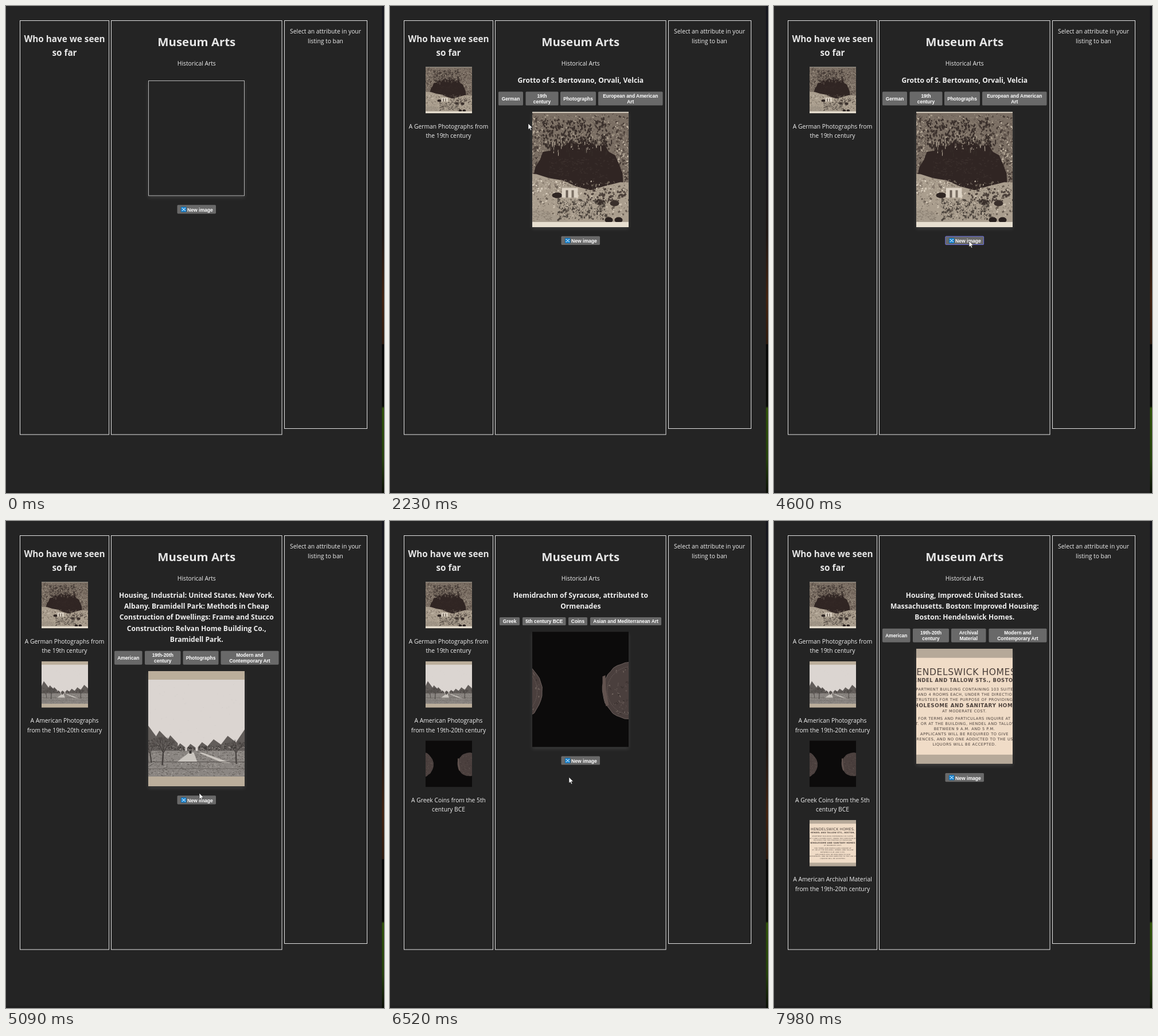
An HTML page for the animation above (8000 ms loop, 659 by 850 pixels).

```html
<!DOCTYPE html>
<html lang="en">
<head>
<meta charset="utf-8">
<title>Museum Arts</title>
<style>
  html, body { margin: 0; width: 100%; height: 100%; overflow: hidden; background: #242424; }
  svg { display: block; }
  text { font: 10.3px "Open Sans", sans-serif; fill: #f0f0f0; text-anchor: middle; }
  .h1 { font-size: 20.4px; font-weight: 700; fill: #e6e6e6; }
  .h2 { font-size: 15.3px; font-weight: 700; fill: #e6e6e6; }
  .title { font-size: 12.1px; font-weight: 700; }
  .tag { font: bold 8.4px "Liberation Sans", Arial, sans-serif; fill: #fff; }
  .print { font: 6.6px "DejaVu Sans", sans-serif; letter-spacing: .55px; fill: #4b403b; }
  .panel { fill: none; stroke: #e2e2e2; }
  .frame { fill: #242424; filter: drop-shadow(0 3px 3px #ffffff1c); }
</style>
</head>
<body>
<svg id="stage" width="659" height="850" viewBox="0 0 659 850">
  <defs>
    <linearGradient id="edge" x2="0" y2="1">
      <stop offset="0" stop-color="#15161d"/>
      <stop offset=".32" stop-color="#16161e"/>
      <stop offset=".47" stop-color="#1d1512"/>
      <stop offset=".6" stop-color="#41220f"/>
      <stop offset=".694" stop-color="#2e1a0e"/>
      <stop offset=".695" stop-color="#050505"/>
      <stop offset=".822" stop-color="#080a05"/>
      <stop offset=".826" stop-color="#2f5208"/>
      <stop offset=".93" stop-color="#24400a"/>
      <stop offset="1" stop-color="#0a0d06"/>
    </linearGradient>
    <g id="photos"></g>
  </defs>
  <rect width="659" height="850" fill="#242424"/>
  <rect y="846" width="656" height="4" fill="#202020"/>
  <rect x="655.5" width="4" height="850" fill="url(#edge)"/>
  <rect class="panel" x="24.5" y="25.5" width="155" height="722.5"/>
  <rect class="panel" x="183.5" y="25.5" width="297.5" height="722.5"/>
  <rect class="panel" x="485.5" y="25.5" width="144" height="712"/>
  <text class="h2" x="102" y="63">Who have we seen</text>
  <text class="h2" x="102" y="87">so far</text>
  <text class="h1" x="332.3" y="70">Museum Arts</text>
  <text x="332.3" y="104">Historical Arts</text>
  <text x="557" y="48">Select an attribute in your</text>
  <text x="557" y="64.5">listing to ban</text>
  <g id="content"></g>
  <g id="pointer">
    <path id="arrow" d="M0 0V10.6L2.4 8.4 4.1 12.2 5.8 11.4 4.2 7.8H7.6Z" fill="#fff" stroke="#111" stroke-width=".6"/>
    <path id="beam" d="M-2.5-5.5H-.7L0-5 .7-5.5H2.5M0-5V5M-2.5 5.5H-.7L0 5 .7 5.5H2.5" fill="none" stroke="#b4b4b4" stroke-width=".8"/>
  </g>
</svg>
<script>
const LOOP = 8000, CENTER = 332.3;
const $ = id => document.getElementById(id);

// Each listing: when its text shows, when its picture has loaded, and its layout.
const listings = [
  { shown: 1500, loaded: 1820, imageY: 184.5, tagY: 149.5, tagH: 24,
    title: ['Grotto of S. Bertovano, Orvali, Velcia'],
    tags: [[189, 43, 'German'], [236.5, 57, '19th', 'century'], [297, 62, 'Photographs'], [363, 112.5, 'European and American', 'Art']],
    caption: ['A German Photographs from', 'the 19th century'] },
  { shown: 4740, loaded: 4950, imageY: 262, tagY: 226.7, tagH: 24,
    title: ['Housing, Industrial: United States. New York.', 'Albany. Bramidell Park: Methods in Cheap',
      'Construction of Dwellings: Frame and Stucco', 'Construction: Relvan Home Building Co.,', 'Bramidell Park.'],
    tags: [[189, 48.5, 'American'], [242, 62.5, '19th-20th', 'century'], [308.5, 62, 'Photographs'], [374.5, 101, 'Modern and', 'Contemporary Art']],
    caption: ['A American Photographs', 'from the 19th-20th century'] },
  { shown: 6060, loaded: 6270, imageY: 193.2, tagY: 168, tagH: 14,
    title: ['Hemidrachm of Syracuse, attributed to', 'Ormenades'],
    tags: [[191, 35, 'Greek'], [231, 75.5, '5th century BCE'], [311, 33, 'Coins'], [349, 124, 'Asian and Mediterranean Art']],
    caption: ['A Greek Coins from the 5th', 'century BCE'] },
  { shown: 7420, loaded: 7630, imageY: 222.8, tagY: 187.7, tagH: 24,
    title: ['Housing, Improved: United States.', 'Massachusetts. Boston: Improved Housing:', 'Boston: Hendelswick Homes.'],
    tags: [[189, 48.5, 'American'], [242, 63, '19th-20th', 'century'], [309, 60.5, 'Archival', 'Material'], [374.5, 101, 'Modern and', 'Contemporary Art']],
    caption: ['A American Archival Material', 'from the 19th-20th century'] }
];

// Pointer stops: time, x, y.
const path = [
  [430, 646, 818], [900, 212, 265], [1350, 341.5, 359.5], [1700, 341.5, 359.5], [2230, 241, 205], [2400, 214, 190],
  [2600, 325, 162], [2860, 338, 404], [2960, 345, 417], [3300, 262, 163], [3700, 236, 226], [3910, 286.5, 399.5],
  [4150, 335, 447], [4470, 340, 410], [4740, 340, 410], [5090, 337, 475], [5370, 337, 487], [6060, 337, 487],
  [6520, 312, 447], [6660, 312, 448], [7080, 335, 417], [7420, 335, 417], [7950, 367, 128], [LOOP, 367, 128]
];

let seed = 7;
const rand = () => (seed = seed * 16807 % 2147483647) / 2147483647;
const spread = size => (rand() - .5) * size;
const rect = (x, y, w, h, fill, extra = '') => `<rect x="${x}" y="${y}" width="${w}" height="${h}" fill="${fill}" ${extra}/>`;
const shape = (d, fill) => `<path d="${d}" fill="${fill}"/>`;
const ellipse = (x, y, rx, ry, fill) => `<ellipse cx="${x}" cy="${y}" rx="${rx}" ry="${ry}" fill="${fill}"/>`;
const label = (x, y, text, cls = '', extra = '') => `<text class="${cls}" x="${x}" y="${y}" ${extra}>${text}</text>`;

// Random short strokes inside a box.
function specks(count, x, y, w, h, dx, dy, color, width = 1) {
  let d = '';
  for (let i = 0; i < count; i++)
    d += `M${(x + rand() * w).toFixed(1)} ${(y + rand() * h).toFixed(1)}l${spread(dx).toFixed(1)} ${spread(dy).toFixed(1)}`;
  return `<path d="${d}" fill="none" stroke="${color}" stroke-width="${width}"/>`;
}

// Coarse and fine strokes together, for stone and leaves.
const texture = (amount, x, y, w, h, dark, light) =>
  specks(amount * .3, x, y, w, h, 9, 9, dark, 3) + specks(amount * .25, x, y, w, h, 7, 7, light, 2.4)
  + specks(amount, x, y, w, h, 4, 5, dark, 1) + specks(amount * .8, x, y, w, h, 4, 4, light, .9);

function tree(x, y, angle, length, width) {
  if (length < 3) return '';
  const x2 = x + Math.cos(angle) * length, y2 = y + Math.sin(angle) * length;
  let out = `<path d="M${x.toFixed(1)} ${y.toFixed(1)}L${x2.toFixed(1)} ${y2.toFixed(1)}" stroke="#45403e" stroke-width="${width}"/>`;
  for (const turn of [-.7, 0, .6]) out += tree(x2, y2, angle + turn + spread(.5), length * .62, width * .6);
  return out;
}

// Pictures are drawn on a 201 x 201 square.
const grotto = () => rect(0, 0, 201, 201, '#e7dfd0') + rect(0, 2, 201, 190, '#7b6f64')
  + texture(650, 0, 5, 201, 125, '#463b35', '#a89c8c')
  + texture(150, 162, 20, 39, 100, '#5a4e46', '#c8bcab')
  + texture(130, 0, 10, 32, 100, '#51463f', '#b9ad9c')
  + specks(260, 36, 14, 112, 50, 6, 12, '#3a302c', 2.6)
  + specks(140, 36, 14, 112, 44, 3, 8, '#8f8375', 1)
  + shape('M18 114L22 96 30 84 35 70 48 68 55 58 70 61 82 53 98 57 112 51 128 60 143 58 150 70 161 76 168 92 174 108 175 126 150 140 118 140 60 130Z', '#302523')
  + specks(40, 50, 44, 100, 24, 1, 20, '#b3a797', 1.1)
  + specks(70, 40, 48, 115, 24, 1, 17, '#342a27', 1.8)
  + specks(160, 45, 80, 112, 42, 8, 3, '#3a2f2c', 1.4)
  + shape('M0 107L24 109 46 116 70 120 92 130 118 137 142 130 170 123 201 124V192H0Z', '#aa9e8e')
  + texture(270, 0, 122, 201, 64, '#6a5f54', '#cfc3b2')
  + texture(70, 8, 118, 70, 25, '#8b7e71', '#ded3c3')
  + specks(70, 110, 135, 80, 22, 9, 4, '#4b403a', 3)
  + ellipse(60, 146, 9, 5, '#2f2623') + ellipse(135, 158, 9, 5, '#392f2b') + ellipse(160, 160, 8, 5, '#392f2b')
  + rect(68, 133, 28, 17, '#ddd3c5') + rect(75, 137, 4, 13, '#6c6157') + rect(85, 137, 4, 13, '#7b7064')
  + shape('M0 167Q35 170 78 190V192H0Z', '#a69b8c') + specks(120, 0, 172, 50, 18, 7, 2, '#867b6e')
  + texture(260, 60, 154, 84, 34, '#4c443d', '#a69b8c')
  + ellipse(150, 189, 7, 5, '#29211f') + ellipse(167, 189, 7, 5, '#29211f') + rect(0, 192.5, 201, 9, '#e7dfd0');

const house = (x, y, w, h) =>
  shape(`M${x} ${y + h}V${y + h * .55}L${x + w * .4} ${y}L${x + w} ${y + h * .5}V${y + h}Z`, '#625d5a')
  + specks(30, x + 2, y + h * .5, w - 4, h * .4, 1, 5, '#393533', 1.5)
  + specks(14, x + 2, y + h * .6, w - 4, h * .3, 3, 3, '#aaa39e', 1);

const street = () => rect(0, 0, 201, 201, '#bbae9b') + rect(0, 15, 201, 169, '#dbd5d1')
  + specks(100, 0, 18, 201, 105, 4, 2, '#d3cecb', 1)
  + house(-4, 86, 34, 55) + house(24, 104, 30, 37) + house(46, 112, 22, 28) + house(66, 126, 15, 14)
  + house(84, 127, 15, 13) + house(103, 124, 18, 16) + house(120, 119, 26, 22) + house(143, 113, 30, 28) + house(170, 102, 36, 39)
  + rect(0, 139, 201, 45, '#8b8682')
  + specks(750, 0, 140, 201, 43, 6, 1.5, '#615d59', .9)
  + specks(350, 0, 140, 201, 43, 6, 1, '#b4afa9', .7)
  + shape('M88 142L66 159H102L96 142Z', '#cac5bf') + shape('M106 143L146 160H160L110 142Z', '#cbc6c0')
  + rect(0, 158, 201, 1, '#55504d') + rect(0, 170, 201, 1, '#6a6561')
  + tree(41, 164, -1.5, 21, 2.6) + tree(170, 162, -1.6, 19, 2.2) + tree(22, 160, -1.7, 17, 2)
  + rect(88, 139, 4, 5, '#363230');

const coin = (x, y, r) => {
  let rim = '';
  for (let a = 0; a < 6.28; a += .15) {
    const reach = r - rand() * 2;
    rim += `${(x + Math.cos(a) * reach).toFixed(1)} ${(y + Math.sin(a) * reach).toFixed(1)} `;
  }
  let out = `<polygon points="${rim}" fill="#4a3f3d" stroke="#6f6360" stroke-width="1"/>`;
  for (let i = 0; i < 80; i++) {
    const a = rand() * 6.28, d = r * Math.sqrt(rand()) * .9;
    out += specks(3, x + Math.cos(a) * d, y + Math.sin(a) * d, 3, 3, 3, 6, ['#83766f', '#2f2726', '#665a56'][i % 3], .8);
  }
  return out + `<circle cx="${x}" cy="${y}" r="${r * .82}" fill="none" stroke="#857873" stroke-dasharray="1.5 1.5" opacity=".6"/>`;
};
const coins = () => rect(0, 0, 201, 201, '#0c0b0b') + coin(-21, 104, 56) + coin(189, 103, 51)
  + shape('M139 78l5-2 1 25 5 27-5 2-6-25Z', '#62534f');

const printed = [
  [46, 'HENDELSWICK HOMES.', 15.6], [58, 'HENDEL AND TALLOW STS., BOSTON,', 8.4, 700],
  [73, 'APARTMENT BUILDING CONTAINING 103 SUITES'], [82, 'OF 3 AND 4 ROOMS EACH, UNDER THE DIRECTION OF'],
  [91, 'TRUSTEES FOR THE PURPOSE OF PROVIDING'], [102.5, 'WHOLESOME AND SANITARY HOMES', 8.8, 700],
  [111, 'AT MODERATE COST.'], [124, 'FOR TERMS AND PARTICULARS INQUIRE AT'],
  [133, 'ST. OR AT THE BUILDING, HENDEL AND TALLOW'], [142, 'BETWEEN 9 A.M. AND 5 P.M.'],
  [151, 'APPLICANTS WILL BE REQUIRED TO GIVE'], [160, 'REFERENCES, AND NO ONE ADDICTED TO THE USE OF'],
  [169, 'LIQUORS WILL BE ACCEPTED.']
];
const card = () => rect(0, 0, 201, 201, '#b6a999') + rect(0, 16, 201, 169, '#f0dcc7')
  + printed.map(([y, text, size = 6.6, weight = 400]) =>
    label(100.5, y, text, 'print', `style="font-size:${size}px;font-weight:${weight}"`)).join('');

$('photos').innerHTML = [grotto, street, coins, card].map((draw, i) => `<g id="photo${i}">${draw()}</g>`).join('');

const picture = (i, x, y, w, h, view) =>
  `<svg x="${x}" y="${y}" width="${w}" height="${h}" viewBox="${view}"><use href="#photo${i}"/></svg>`;

function button(x, y, w, h, mouse) {
  const over = mouse.x >= x && mouse.x <= x + w && mouse.y >= y && mouse.y <= y + h;
  return rect(x, y, w, h, '#696969', 'rx="1.6"')
    + (over ? rect(x + .4, y + .4, w - .8, h - .8, 'none', 'rx="1.4" stroke="#646cff" stroke-width=".8"') : '');
}

function tag([x, w, ...lines], y, h, mouse) {
  const first = y + h / 2 + 3 - (lines.length - 1) * 5;
  return button(x, y, w, h, mouse) + lines.map((line, i) => label(x + w / 2, first + i * 10, line, 'tag')).join('');
}

function newImageButton(y, mouse) {
  return button(298.5, y, 67.5, 15.2, mouse) + rect(305, y + 3.3, 9.4, 9, '#1684d2', 'rx=".8" stroke="#35526b" stroke-width=".6"')
    + `<path d="M306.5 ${y + 5.8}h1.5l3.6 4h1.4M306.5 ${y + 9.8}h1.5l3.6-4h1.4" fill="none" stroke="#eaf5ff" stroke-width="1"/>`
    + label(338.4, y + 11.6, 'New image', 'tag', 'style="font-size:8.6px"');
}

function content(t, mouse) {
  const shown = listings.filter(l => t >= l.shown).length;
  const loaded = listings.filter(l => t >= l.loaded).length;
  const current = listings[shown - 1];
  const top = current ? current.imageY : 130;
  let out = rect(248, top, 168, 201.5, '#242424', 'class="frame"');
  if (!current) out += rect(248.5, 130.5, 167, 200.5, 'none', 'stroke="#b4b4b4"');
  if (loaded) out += picture(loaded - 1, 248, top, 168, 201.5, '16.5 0 168 201.5');
  out += newImageButton(top + 217.2, mouse);
  if (current) {
    out += current.title.map((line, i) => label(CENTER, 133.5 + i * 19.4, line, 'title')).join('');
    out += current.tags.map(item => tag(item, current.tagY, current.tagH, mouse)).join('');
  }
  listings.slice(0, shown).forEach((l, i) => {
    const y = 106.3 + i * 138.5;
    if (i < loaded) out += picture(i, 62, y, 81, 81, '0 0 201 201');
    out += label(102, y + 107.5, l.caption[0]) + label(102, y + 123.7, l.caption[1]);
  });
  return out;
}

function pointerAt(t) {
  const i = Math.max(1, path.findIndex(p => p[0] > t));
  const [t0, x0, y0] = path[i - 1], [t1, x1, y1] = path[i];
  const k = Math.max(0, (t - t0) / (t1 - t0)), ease = k * k * (3 - 2 * k);
  return { x: x0 + (x1 - x0) * ease, y: y0 + (y1 - y0) * ease };
}

let drawn = '';
function render() {
  const t = performance.now() % LOOP;
  const mouse = pointerAt(t);
  const html = content(t, mouse);
  if (html !== drawn) $('content').innerHTML = drawn = html;
  const overTitle = t > listings[3].shown && mouse.y < 176;
  $('pointer').setAttribute('transform', `translate(${mouse.x.toFixed(1)} ${mouse.y.toFixed(1)})`);
  $('pointer').style.display = t < path[0][0] ? 'none' : '';
  $('arrow').style.display = overTitle ? 'none' : '';
  $('beam').style.display = overTitle ? '' : 'none';
  requestAnimationFrame(render);
}
render();
</script>
</body>
</html>
```
